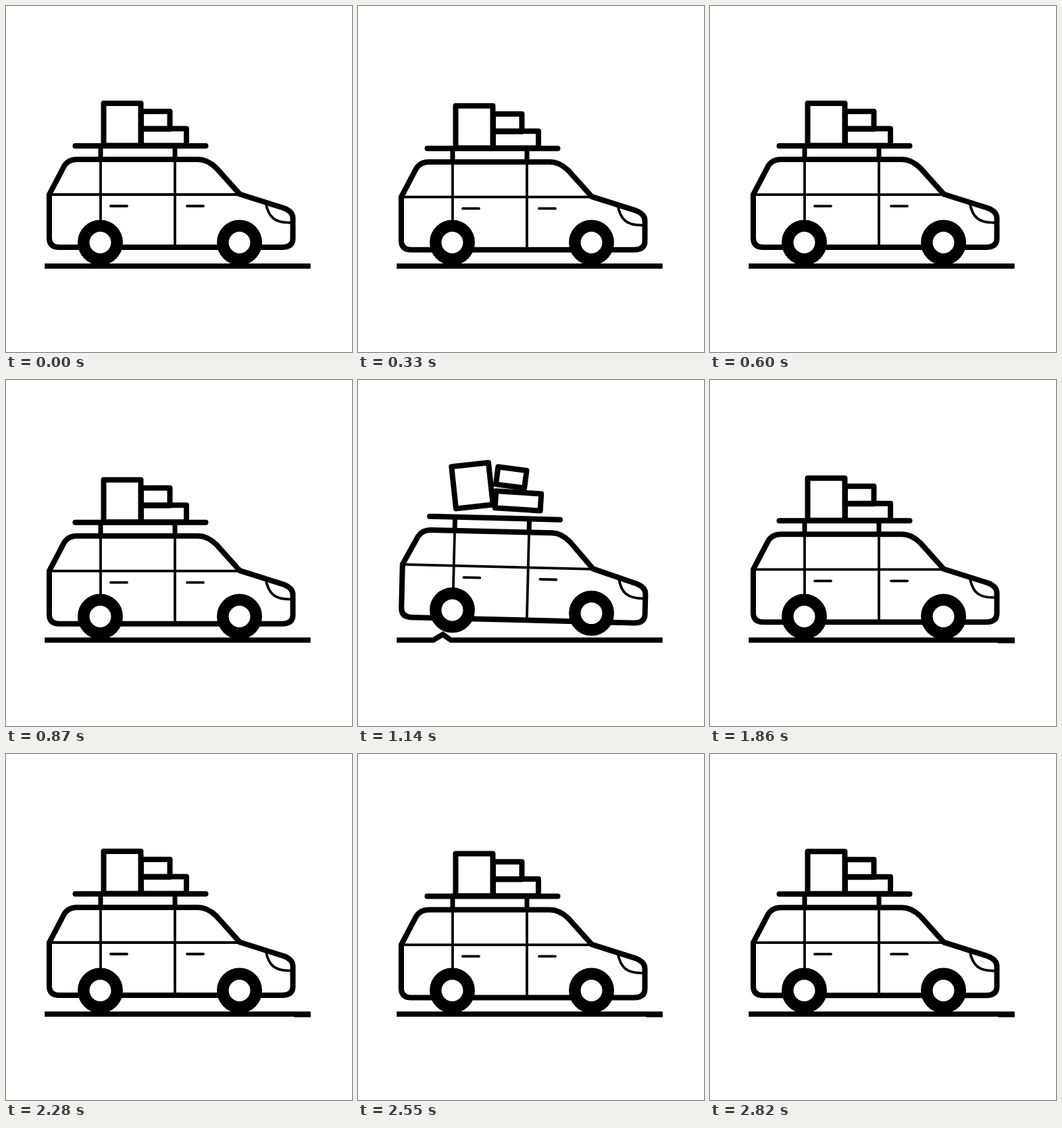
An HTML page that plays this animation: 512x512 px, repeating every 2.85 s.

```html
<!DOCTYPE html>
<html lang="en">
<head>
<meta charset="utf-8">
<title>Loaded car</title>
<style>
  html, body { margin: 0; width: 100%; height: 100%; overflow: hidden; background: #fff; }
  svg { display: block; width: 100vw; height: 100vh; }
  .thick { stroke-width: 8; }
  .thin { stroke-width: 3.8; }
</style>
</head>
<body>
<svg viewBox="0 0 512 512" fill="none" stroke="#000" stroke-linecap="round" stroke-linejoin="round">
  <clipPath id="road"><rect x="57.3" y="360" width="393.4" height="40"/></clipPath>
  <g clip-path="url(#road)" stroke-width="7.8">
    <path id="ground" stroke-linejoin="miter"/>
    <path id="seam" d="M426 385.5H460" stroke-linecap="butt"/>
  </g>
  <g id="body">
    <g class="thin">
      <path d="M64 279H346M140 229V340M250 229V355"/>
      <path d="M155 296H179M268 296H292"/>
      <path d="M384.5 292C388.5 312 397 322 424 320.5"/>
    </g>
    <g class="thick">
      <path d="M64 279L86 237Q92 227 105 227H284Q298 227 311 239.500L346 278.500L411 299Q424.500 304 424.500 314V344Q424.500 357 408 357H79Q64 357 64 343Z"/>
      <path d="M102.500 207H295.500"/>
      <path d="M140 208V226M250 208V226" stroke-width="7"/>
      <rect id="low" x="200" y="181.500" width="67" height="25"/>
      <rect id="small" x="200" y="156" width="42.500" height="26"/>
      <rect id="big" x="144.500" y="144" width="55" height="62.500"/>
    </g>
  </g>
  <g fill="#fff" stroke-width="17.500">
    <circle id="rearWheel" cx="139.500" cy="350" r="24.700"/>
    <circle id="frontWheel" cx="345.500" cy="350" r="24.700"/>
  </g>
</svg>
<script>
const LOOP = 2850, STEP = 30, BOB = 570;
const FRONT = 346, REAR = 140, AXLE = 350;
const FRONT_HIT = 975, REAR_HIT = 1150, TOSS = 990;
const el = id => document.getElementById(id);
const progress = (t, from, to) => Math.min(1, Math.max(0, (t - from) / (to - from)));
const smooth = p => (1 - Math.cos(Math.PI * p)) / 2;

// Parabolic flight from 0 up to 1 and back
function hop(t, from, to) {
  const p = progress(t, from, to);
  return 4 * p * (1 - p);
}

// Quick rise onto the bump, slow drop off it
function wheelLift(age) {
  return 10.2 * (1 - smooth(progress(Math.abs(age), 0, age < 0 ? 60 : 320)));
}

// Damped suspension kick, starting just before the wheel peaks
function springKick(age) {
  const s = Math.max(0, age + 40);
  return -11 * Math.exp(-s / 120) * Math.sin(2 * Math.PI * s / 360);
}

function place(id, dx, dy, angle) {
  const box = el(id).getBBox();
  const cx = box.x + box.width / 2, cy = box.y + box.height / 2;
  el(id).setAttribute("transform", `translate(${dx} ${dy}) rotate(${angle} ${cx} ${cy})`);
}

function render(t) {
  const phase = (t % BOB / BOB) ** 1.2;
  const bob = 3.7 * smooth(2 * phase);
  const front = bob + springKick(t - FRONT_HIT);
  const rear = bob + springKick(t - REAR_HIT);
  const tilt = Math.atan2(front - rear, FRONT - REAR) * 180 / Math.PI;
  el("body").setAttribute("transform", `translate(0 ${front}) rotate(${tilt} ${FRONT} ${AXLE})`);

  const toss = hop(t, TOSS, 1380);
  place("big", -8.2 * toss, -16.2 * toss, -8 * toss);
  place("low", -0.8 * toss, -14 * toss, 2.3 * toss);

  // The small box lands on its corner, then tips back flat
  const lean = 25.7 * smooth(progress(t, 1010, 1420)) * (1 - progress(t, 1420, 1620) ** 3);
  place("small", 0.4 * lean - 2 * toss, -0.42 * lean - 22 * hop(t, TOSS, 1410), lean);

  el("frontWheel").setAttribute("cy", AXLE - wheelLift(t - FRONT_HIT));
  el("rearWheel").setAttribute("cy", AXLE - wheelLift(t - REAR_HIT));

  const bump = 125.5 - 1.26 * (t - 1140);
  const hasBump = bump > 40 && bump < 465;
  el("ground").setAttribute("d", hasBump
    ? `M20 384.9H${bump - 14}L${bump} 376.5L${bump + 12} 384.9H490` : "M20 384.9H490");
  el("seam").setAttribute("visibility", t > 1200 ? "visible" : "hidden");
}

const start = performance.now();
function tick() {
  const t = (performance.now() - start) % LOOP;
  render(Math.floor(t / STEP) * STEP);
  requestAnimationFrame(tick);
}
tick();
</script>
</body>
</html>
```
